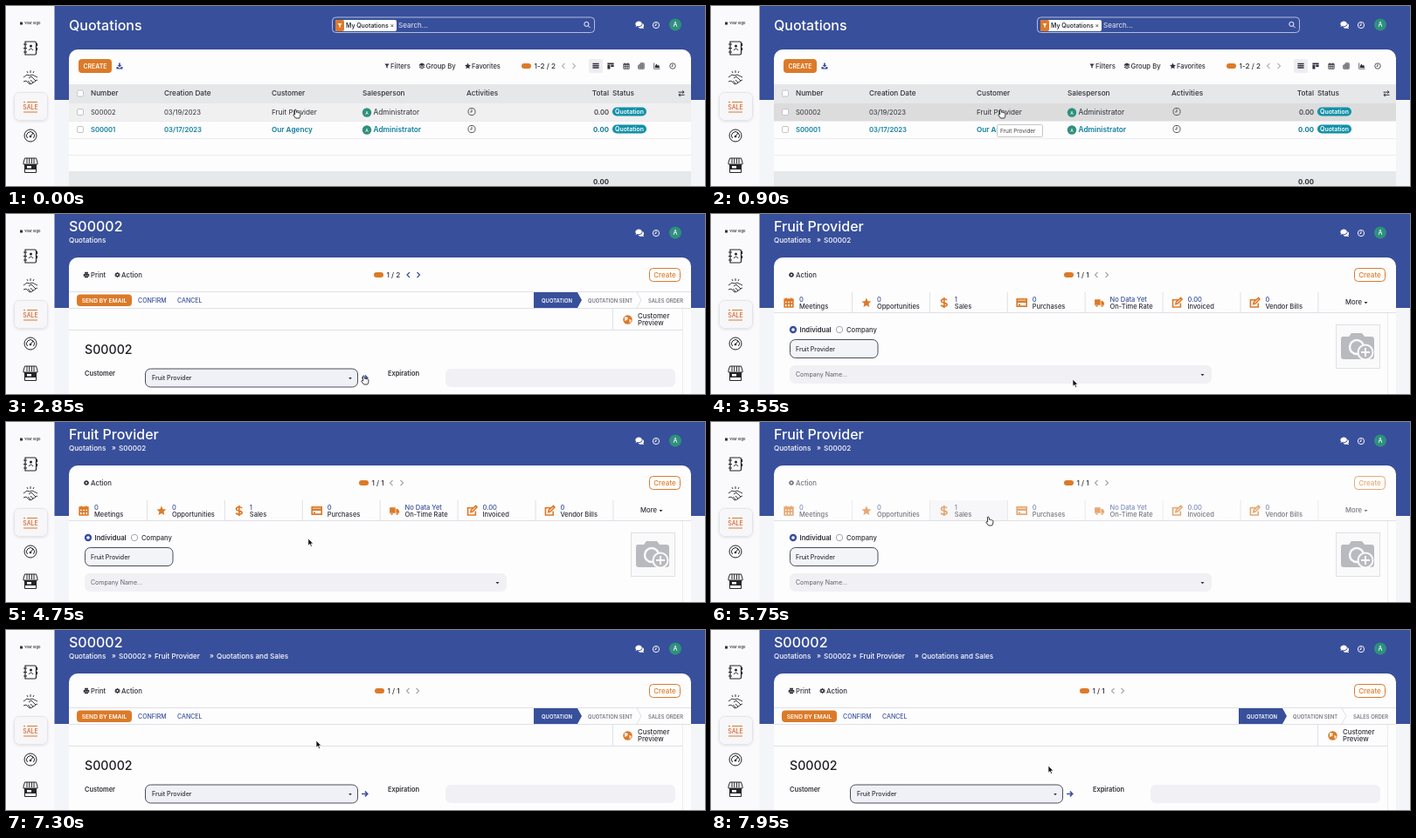
These frames come from a looping animation (800 px wide and 207 px high, 8 s). An HTML page:

```html
<!DOCTYPE html>
<html lang="en">
<head>
<meta charset="utf-8">
<title>Quotation workflow</title>
<style>
html, body { margin: 0; width: 100%; height: 100%; overflow: hidden; background: #f4f5f8; }
svg { display: block; width: 100vw; height: 100vh; font-family: Inter, "Open Sans", sans-serif; }
text { white-space: pre; }
</style>
</head>
<body>
<svg id="stage" viewBox="0 0 800 207"></svg>
<script>
const BLUE = '#384f9b', ORANGE = '#dc7a28', INK = '#2f3038', TEAL = '#0e7f9c', LINE = '#dfe0e5', GREEN = '#2f907d';
const LEFT = 72, RIGHT = 784, WIDTH = RIGHT - LEFT;
const CLIENT = 'Fruit Provider', OTHER = 'Our Agency', LOOP = 8000;

// --- drawing helpers; text is placed by its vertical centre ---
const text = (x, y, s, size = 8.2, fill = INK, weight = 500, anchor = 'start') =>
  `<text x="${x}" y="${y + size * .36}" font-size="${size}" fill="${fill}" font-weight="${weight}" text-anchor="${anchor}">${s}</text>`;
const rect = (x, y, w, h, fill, r = 0, stroke = 'none', extra = '') =>
  `<rect x="${x}" y="${y}" width="${w}" height="${h}" rx="${r}" fill="${fill}" stroke="${stroke}" ${extra}/>`;
const line = (x1, y1, x2, y2, c = LINE, w = 1) =>
  `<path d="M${x1} ${y1}L${x2} ${y2}" stroke="${c}" stroke-width="${w}"/>`;
const circle = (x, y, r, fill, stroke = 'none', w = 1) =>
  `<circle cx="${x}" cy="${y}" r="${r}" fill="${fill}" stroke="${stroke}" stroke-width="${w}"/>`;
const group = (id, body) => `<g id="${id}">${body}</g>`;
const rule = (y, color = LINE) => line(LEFT, y, RIGHT, y, color);

// Icons live in a box of about 10 x 10 around the origin.
const FILLED = {
  funnel: 'M-4-4H4L1 0V4L-1 3V0Z',
  star: 'M0-5L1.5-1.7 5-1.4 2.3 1 3.1 4.5 0 2.7-3.1 4.5-2.3 1-5-1.4-1.5-1.7Z',
  layers: 'M0-5L5-2.5 0 0-5-2.5ZM-5-.3L-3.5-1 0 .9 3.5-1 5-.3 0 2.2ZM-5 2L-3.5 1.3 0 3.2 3.5 1.3 5 2 0 4.5Z',
  download: 'M-1.2-5H1.2V-1.5H3.5L0 2-3.5-1.5H-1.2ZM-5 1.5H-3L0 4 3 1.5H5V5H-5Z',
  list: 'M-5-4.5H5V-2.4H-5ZM-5-1.4H5V.7H-5ZM-5 1.7H5V3.8H-5Z',
  kanban: 'M-5-5H5V-2.8H-5ZM-5-2H-.8V5H-5ZM.4-2H5V1.5H.4Z',
  chart: 'M-5-5H-4V4H5V5H-5ZM-3 3V0L-.8-3.5 1.2-.5 2.8-2 4.5 3Z',
  caret: 'M-4-2H4L0 2.5Z',
  print: 'M-3-5H3V-2H-3ZM-5-1.5H5V3H3.5V1H-3.5V3H-5ZM-3 2H3V5H-3Z',
  chat: 'M-5-1C-5-6 3-6 3-1.5 3 1-1 2-2.5 1L-5 2-4 .5ZM3.8-2C6-1 5.5 2 4.5 2.7L5.5 4.5 3 3.7C1 4.5-1 3.5-1.5 2.3 2 2.5 4 .5 3.8-2Z',
  truck: 'M-5-3.5H1V2.5H-5ZM1.6-1.8H3.5L5 .4V2.5H1.6ZM-4.2 3A1.4 1.4 0 0 0-1.4 3ZM1.4 3A1.4 1.4 0 0 0 4.2 3Z',
};
const STROKED = {
  search: 'M2.4-.8A3.2 3.2 0 1 1-4-.8 3.2 3.2 0 1 1 2.4-.8M1.6 1.6L4.5 4.5',
  clock: 'M4.5 0A4.5 4.5 0 1 1-4.5 0 4.5 4.5 0 1 1 4.5 0M0-3V.5H-2',
  calendar: 'M-4.4-3.5H4.4V4.5H-4.4ZM-4.4-2H4.4M-4.4 1H4.4M-1.5-2V4.5M1.5-2V4.5M-2.5-5V-3M2.5-5V-3',
  grid: 'M-4.4-1.4H-1.4V-4.4H4.4V4.4H-4.4ZM-4.4 1.5H4.4M-1.4-1.4H4.4M-1.4-1.4V4.4M1.5-4.4V4.4',
  left: 'M2-4L-2 0 2 4', right: 'M-2-4L2 0-2 4',
  arrow: 'M-4.5 0H4M.5-3.8L4.4 0 .5 3.8',
  gear: 'M2.7 0A2.7 2.7 0 1 1-2.7 0 2.7 2.7 0 1 1 2.7 0M0-5V-3M0 5V3M-5 0H-3M5 0H3M-3.5-3.5L-2-2M3.5 3.5L2 2M-3.5 3.5L-2 2M3.5-3.5L2-2',
  sliders: 'M-5-2H4M1.5-4.5L4.5-2 1.5 0M5 2.5H-4M-1.5 .5L-4.5 2.5-1.5 4.8',
  dollar: 'M3-2.6C2-4.3-3-4.4-3-1.8-3 .6 3-.4 3 2.1 3 4.5-2.5 4.2-3.2 2.4M0-5.5V5.5',
  card: 'M-5-3.7H5V3.7H-5ZM-5-1.6H5M-5-.8H5M-3.5 2H-1.5',
  edit: 'M2-3H-4.5V4.5H3.5V.5M-1.5 1.5L-1-.8 3.8-5 5-3.6 .5 1Z',
};
const icon = (name, x, y, color = INK, scale = .8, width = 1.4) => {
  const fill = FILLED[name];
  return `<path transform="translate(${x} ${y}) scale(${scale})" d="${fill || STROKED[name]}" ` +
    (fill ? `fill="${color}"/>` : `fill="none" stroke="${color}" stroke-width="${width}"/>`);
};

// --- page frame ---
function sidebar() {
  const dark = '#24252b';
  const outline = (d, width = 1) => `<path d="${d}" fill="none" stroke="${dark}" stroke-width="${width}"/>`;
  return rect(0, 0, 55.5, 207, '#fafafc') +
    rect(16, 18.5, 3, 3, '#333') + text(21, 20, 'Your logo', 4, '#333', 600) +
    outline('M22 41h11q1.500 0 1.500 1.500v12q0 1.500-1.500 1.500h-11zM20 44h4M20 48.500h4M20 53h4M35.500 43v3M35.500 48v3', 1.2) +
    circle(28.5, 46, 1.5, dark) + outline('M26 51q2.500-4 5 0') +
    outline('M20 82l4-3 3 1 3-1 6 3M20 87l3-1 4 4 3-1 4-3 2-1M26 83l3-2 5 5M25 86l3 3M28 85l3 3M28 74v3M24 75l1 2M32 75l-1 2', .9) +
    rect(9.5, 99.5, 38, 32, '#f7f7fa', 6, '#e4e5ea', 'filter="url(#soft)"') +
    line(20, 110.5, 22, 110.5, ORANGE) + line(24, 110.5, 36, 110.5, ORANGE) + line(20, 122, 36, 122, ORANGE) +
    text(28, 116.4, 'SALE', 7, '#d9602b', 500, 'middle') +
    outline('M35 149a7 7 0 1 1-14 0 7 7 0 1 1 14 0M24.500 152a4.500 4.500 0 1 1 7 0M28 150l3-4') + circle(28, 150, 1.3, dark) +
    outline('M21.500 175h13l1.500 5v2h-16v-2zM24 175v6M26.700 175v6M29.400 175v6M32 175v6') +
    rect(21, 182, 14, 6, dark) + outline('M21.500 188v3.500h13v-3.500') + rect(24, 184, 5, 2.5, '#fafafc');
}

const frame = () =>
  `<defs><filter id="soft"><feDropShadow dx="0" dy="1" stdDeviation="1.500" flood-opacity=".1"/></filter></defs>` +
  rect(0, 0, 800, 207, '#f4f5f8') + sidebar() + rect(55.5, 0, 745, 108, BLUE) +
  rect(LEFT, 50, WIDTH, 170, '#fdfdfe', 10) +
  icon('chat', 725, 22, '#fff', .95) + icon('clock', 744, 22, '#fff', .8, 1.2) +
  circle(766, 21.5, 7, GREEN) + text(766, 21.7, 'A', 7, '#fff', 500, 'middle');

const title = (y, s) => text(LEFT, y, s, 16, '#fff');
const heading = (s, crumbs) => title(14, s) +
  crumbs.map(([x, label], i) => (i ? text(x - 8, 29.5, '»', 8, '#fff') : '') + text(x, 30, label, 8.1, '#fff')).join('');

const pager = (x, y, label, [left, right], color) =>
  rect(x, y - 3, 11, 6, ORANGE, 3) + text(x + 14.5, y, label, 8.2) +
  icon('left', left, y, color, .75, 1.6) + icon('right', right, y, color, .75, 1.6);

const createOutline = () => rect(736.5, 62.5, 35, 15, '#fff', 4, ORANGE) + text(754, 70, 'Create', 8, ORANGE, 500, 'middle');

// --- list pages ---
function listBase({ y, views, columns, tag }) {
  const placeholder = x => text(x, 22, 'Search...', 8.1, '#e8ebf5', 400);
  return rect(373.5, 13, 300, 17.5, 'none', 4, '#b4bddb') + icon('search', 665, 21.5, '#fff', .8, 1.2) +
    (tag
      ? rect(377, 16, 70, 13, '#fff', 2) + rect(377, 16, 10, 13, ORANGE, 2) + icon('funnel', 382, 22.5, '#fff', .6) +
        text(389, 22.3, 'My Quotations', 6.9, INK, 600) + text(439.5, 22.5, '×', 7, '#555') + placeholder(449)
      : placeholder(377)) +
    rect(83, y - 8, 38, 16, ORANGE, 4) + text(102, y + .3, 'CREATE', 6.9, '#fff', 600, 'middle') +
    icon('download', 130, y, BLUE, .7) +
    icon('funnel', 436, y, INK, .65) + text(440, y, 'Filters', 7.8) +
    icon('layers', 476, y, INK, .7) + text(480.5, y, 'Group By', 7.7) +
    icon('star', 528.5, y, INK, .7) + text(533, y, 'Favorites', 7.5) +
    rect(views[0][1] - 8, y - 8, 16, 16, '#eeeef2', 2) +
    views.map(([name, x]) => icon(name, x, y, INK, .72, 1.1)).join('') +
    rect(LEFT, 90, WIDTH, 22, '#e6e7e9') + rect(81.5, 97, 7, 7, '#fff', 1.5, '#c3c5cc') +
    columns.map(([x, label, anchor]) => text(x, 100.5, label, 8.2, INK, 500, anchor)).join('') +
    icon('sliders', 773, 100.5, INK, .7) + rect(LEFT, 190, WIDTH, 17, '#e7e8ea');
}

function row(y, { id, color = INK, weight = 400, dateX, date, clientX, client, sellerX, clockX, totalX }) {
  return rect(81.5, y - 3.5, 7, 7, '#fff', 1.5, '#c3c5cc') +
    text(97, y, id, 7.6, color, weight) + text(dateX, y, date, 7.7, color, weight) + text(clientX, y, client, 8.2, color, weight) +
    circle(sellerX + 5, y + .5, 5.2, GREEN) + text(sellerX + 5, y + .7, 'A', 5, '#fff', 500, 'middle') +
    text(sellerX + 12.5, y, 'Administrator', 8.3, color, weight) + icon('clock', clockX, y - .5, '#555', .9, 1.1) +
    text(totalX, y, '0.00', 7.8, color, weight + 100, 'end');
}

const badge = y => rect(694, y - 5, 39, 10, '#1391a8', 5) + text(713.5, y, 'Quotation', 6.9, '#fff', 600, 'middle');
const firstRow = (y, h) => rect(LEFT, y, WIDTH, h, '#f0f0f1', 0, 'none', 'class="firstRow"');

function quotations() {
  const cols = { dateX: 181, clientX: 304, sellerX: 408, clockX: 533, totalX: 690 };
  return title(22, 'Quotations') +
    listBase({
      y: 69, tag: true,
      views: [['list', 675], ['kanban', 692], ['calendar', 710], ['grid', 727], ['chart', 745], ['clock', 763]],
      columns: [[97, 'Number'], [181, 'Creation Date'], [304, 'Customer'], [408, 'Salesperson'], [527, 'Activities'], [690, 'Total', 'end'], [694, 'Status']],
    }) + pager(590, 69, '1-2 / 2', [638, 650], '#b4b6bf') + firstRow(112, 20) +
    row(122, { ...cols, id: 'S00002', date: '03/19/2023', client: CLIENT }) + badge(121.5) +
    row(142, { ...cols, id: 'S00001', date: '03/17/2023', client: OTHER, color: TEAL, weight: 600 }) + badge(141.5) +
    [132.5, 152.5, 171.5].map(y => rule(y, '#ececf0')).join('') +
    text(690, 202, '0.00', 7.8, INK, 700, 'end') +
    group('tip', rect(327.5, 136.5, 52, 14, '#fff', 2, '#c4c4c8') + text(331, 144, CLIENT, 6.4, '#444', 400));
}

function orders() {
  return heading('Quotations and Sales', [[72, 'Quotations'], [129, 'S00002'], [170, CLIENT]]) +
    listBase({
      y: 70, views: [['list', 727], ['kanban', 744], ['chart', 762]],
      columns: [[97, 'Number'], [169, 'Order Date'], [257, 'Website'], [329, 'Customer'], [418, 'Salesperson'], [520, 'Activities'], [658, 'Total', 'end'], [662, 'Invoice Status']],
    }) + pager(645.5, 70, '1-1 / 1', [690, 701], '#b4b6bf') + firstRow(113, 20) +
    row(123.5, { id: 'S00002', date: '03/19/2023', client: CLIENT, dateX: 169, clientX: 329, sellerX: 418, clockX: 526, totalX: 658 }) +
    rect(662, 118, 66, 10, '#dcdde1', 5) + text(695, 123, 'Nothing to Invoice', 6.9, INK, 500, 'middle') +
    [133.5, 153.5, 171.5].map(y => rule(y, '#ececf0')).join('') +
    text(658, 202.5, '0.00', 7.8, INK, 700, 'end');
}

// --- form pages ---
function quotationForm(crumbs, pagerPart) {
  return heading('S00002', crumbs) +
    icon('print', 92, 70, INK, .65) + text(97, 70, 'Print', 7.7) +
    icon('gear', 127.5, 70, INK, .6, 2.2) + text(132, 70, 'Action', 7.8) + pagerPart + createOutline() +
    rule(89.5) + rule(108.5) + line(LEFT, 133.5, 774, 133.5) +
    line(774.5, 109, 774.5, 207, '#ececf0') + line(694.5, 109, 694.5, 133) +
    rect(81, 92.5, 63, 13.5, ORANGE, 4) + text(112.5, 99.5, 'SEND BY EMAIL', 6.7, '#fff', 600, 'middle') +
    text(151, 99.5, 'CONFIRM', 7, BLUE) + text(196, 99.5, 'CANCEL', 7, BLUE) +
    `<path d="M604 90h50l5 9-5 9h-50z" fill="${BLUE}"/><path d="M722 90l5 9-5 9" fill="none" stroke="${LINE}"/>` +
    text(613, 99.5, 'QUOTATION', 5.9, '#fff', 600) + text(666, 99.5, 'QUOTATION SENT', 5.8, '#666872') +
    text(735, 99.5, 'SALES ORDER', 5.9, '#666872') +
    circle(711.5, 121.5, 5.2, ORANGE) + `<path d="M708 118l4 1-1 3-3 1zM713 121l3 1-2 4z" fill="#fff" opacity=".85"/>` +
    text(723, 117.5, 'Customer', 7.8) + text(723, 125.5, 'Preview', 7.8) +
    text(90, 156, 'S00002', 14.2, '#1f2027') +
    text(90, 183.5, 'Customer', 7.4, INK, 600) + text(437, 183.5, 'Expiration', 7.4, INK, 600) +
    rect(159.5, 178, 243, 21, '#f0f1f6', 6, '#4a4c5c') + text(167, 188.5, CLIENT, 7.1) +
    icon('caret', 394, 189, INK, .45) + icon('arrow', 410.5, 188.5, BLUE, .75, 2) +
    rect(503, 178, 263, 21, '#f1f1f5', 6);
}

function contact() {
  const stats = [['calendar', '0', 'Meetings'], ['star', '0', 'Opportunities'], ['dollar', '1', 'Sales'], ['card', '0', 'Purchases'],
    ['truck', 'No Data Yet', 'On-Time Rate'], ['edit', '0.00', 'Invoiced'], ['edit', '0', 'Vendor Bills']];
  const buttons = icon('gear', 92, 70, INK, .6, 2.2) + text(97, 70, 'Action', 7.8) + createOutline() +
    stats.map(([name, value, label], i) => {
      const x = 101 + i * 88.9;
      return icon(name, x - 12, 102, ORANGE, 1.1, 1.5) + text(x, 97.8, value, 7.5, BLUE) + text(x, 106, label, 7.5) +
        line(x + 60.5, 90, x + 60.5, 113);
    }).join('') +
    text(726, 101.5, 'More', 7.7) + icon('caret', 749.5, 102, INK, .5);
  return heading(CLIENT, [[72, 'Quotations'], [129, 'S00002']]) +
    pager(404, 70, '1 / 1', [441, 453], '#a5a7b0') +
    group('statHover', rect(250, 90, 90, 23, '#f7f7f9')) + group('buttons', buttons) + rule(113.5) +
    line(774.5, 114, 774.5, 207, '#ececf0') +
    circle(94, 133, 3, '#fff', BLUE, 2.4) + text(101.5, 133, 'Individual', 7.7, INK, 600) +
    circle(147, 133, 3.7, '#fff', '#9a9ca8', .9) + text(155, 133, 'Company', 7.6) +
    rect(90.5, 144.5, 100.5, 21, '#f3f4f8', 6, '#4a4c5c') + text(97, 155, CLIENT, 7) +
    rect(90, 174, 483, 21, '#f1f1f5', 6) + text(97, 184.5, 'Company Name...', 7, '#5d5f69', 400) + icon('caret', 562.5, 185, INK, .5) +
    rect(715.5, 127.5, 50, 50, '#fafafb', 0, '#e0e0e4') +
    `<path d="M723 141h7l3-4h12l3 4h8q3 0 3 3v20q0 3-3 3h-32q-3 0-3-3v-20q0-3 2-3z" fill="#b9babf"/>` +
    circle(739, 153, 8, 'none', '#fafafb', 2.5) + circle(749, 159, 8.5, '#b9babf', '#fafafb', 2) +
    line(744, 159, 754, 159, '#fff', 2) + line(749, 154, 749, 164, '#fff', 2);
}

// --- timeline ---
const scenes = [
  [0, quotations()],
  [1350, quotationForm([[72, 'Quotations']], pager(421, 70, '1 / 2', [460.5, 472], BLUE))],
  [3150, contact()],
  [5850, orders()],
  [7250, quotationForm([[72, 'Quotations'], [129, 'S00002'], [170, CLIENT], [241, 'Quotations and Sales']],
    pager(422, 70, '1 / 1', [460, 471], '#a5a7b0'))],
];
const cursorPath = [[0, 332, 121], [2150, 332, 121], [2800, 410, 188], [3150, 410, 188], [3400, 414, 190], [4300, 414, 190],
  [5000, 318, 111], [5950, 318, 111], [6450, 355, 127], [7350, 355, 127], [7850, 386, 156], [LOOP, 386, 156]];
const handTimes = [[0, 1350], [2700, 3150], [4950, 7250]];
const pressTimes = [[800, 1350], [6900, 7250]];
const within = (t, spans) => spans.some(([a, b]) => t >= a && t < b);

const arrow = `<path d="M0 0V8.200L1.900 6.500 3.200 9.400 4.600 8.800 3.300 6H5.800Z" fill="#111" stroke="#fff" stroke-width=".7"/>`;
const hand = `<path d="M-1.700-1.500Q-.8-2.500 0-1.500L.6 1.400Q1.700.8 2.200 1.700 3.400 1.200 3.800 2.200 5 2 5 3.200L4.600 6.200 3.700 8H-.4L-3.300 4.300Q-3.200 3-1.300 3.900Z" fill="#fff" stroke="#222" stroke-width=".9" stroke-linejoin="round"/>`;

const stage = document.getElementById('stage');
stage.innerHTML = frame() + scenes.map(([, body], i) => group('scene' + i, body)).join('') +
  group('cursor', group('arrow', arrow) + group('hand', hand));
const firstRows = document.querySelectorAll('.firstRow');
const el = id => document.getElementById(id);
const show = (id, on) => el(id).style.display = on ? '' : 'none';

function cursorAt(t) {
  const i = cursorPath.findIndex(p => p[0] > t);
  const [t0, x0, y0] = cursorPath[i - 1], [t1, x1, y1] = cursorPath[i];
  const u = (t - t0) / (t1 - t0), e = u * u * (3 - 2 * u);
  return [x0 + (x1 - x0) * e, y0 + (y1 - y0) * e];
}

function draw(t) {
  scenes.forEach(([start], i) => show('scene' + i, within(t, [[start, scenes[i + 1]?.[0] ?? LOOP]])));
  show('tip', t >= 500);
  firstRows.forEach(r => r.setAttribute('fill', within(t, pressTimes) ? '#dcdcdd' : '#f0f0f1'));
  show('statHover', t >= 4950);
  el('buttons').setAttribute('opacity', t >= 5450 ? .65 : 1);
  const isHand = within(t, handTimes);
  show('hand', isHand);
  show('arrow', !isHand);
  el('cursor').setAttribute('transform', `translate(${cursorAt(t)})`);
}

const begin = performance.now();
function tick() {
  draw((performance.now() - begin) % LOOP);
  requestAnimationFrame(tick);
}
tick();
</script>
</body>
</html>
```
